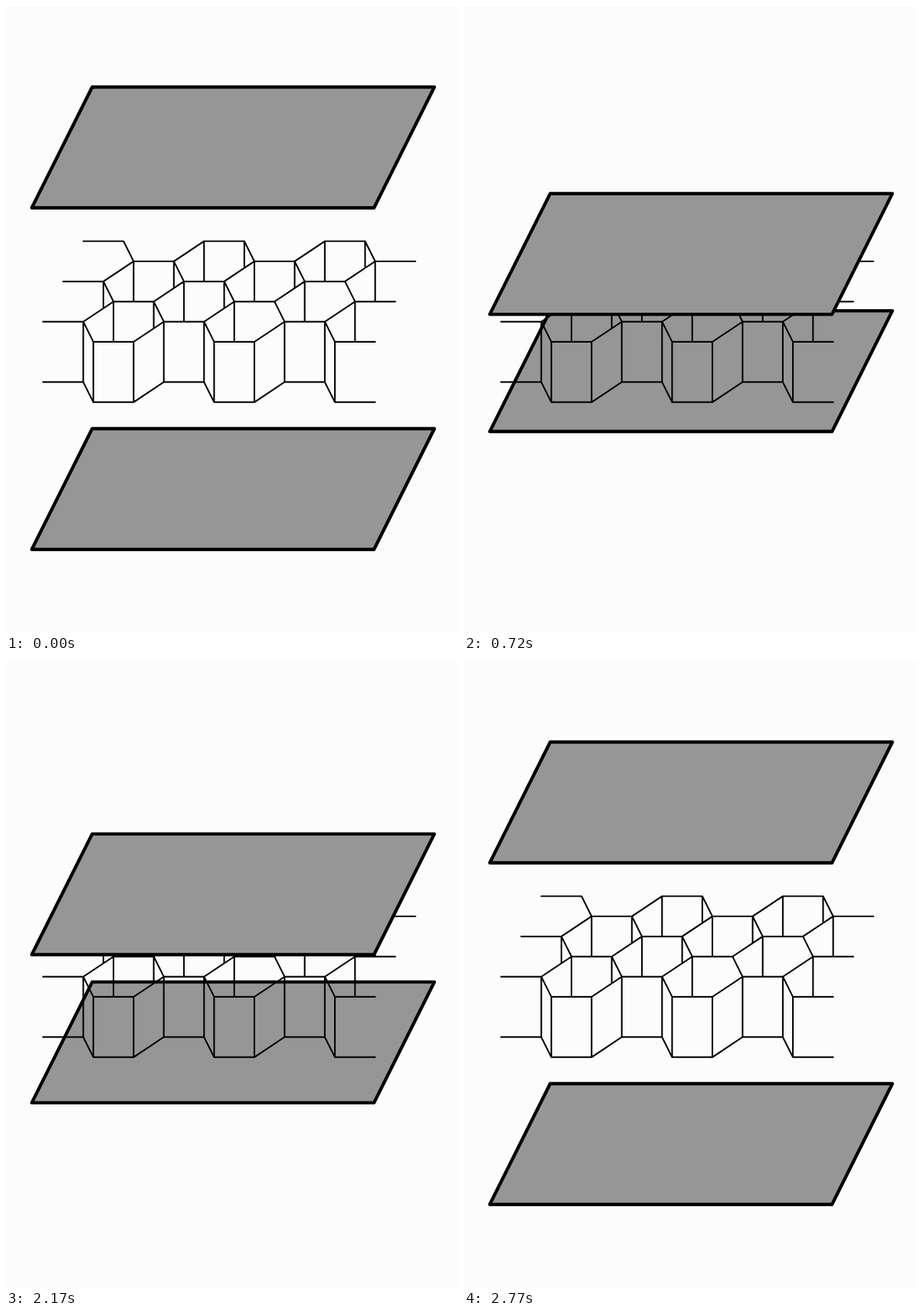
Animation, 635 px wide and 881 px high, one loop 3800 ms. Source, as an HTML page:

```html
<!DOCTYPE html>
<html lang="en">
<head>
<meta charset="utf-8">
<title>Honeycomb sandwich panel</title>
<style>
  html, body { margin: 0; width: 100%; height: 100%; overflow: hidden; background: #fcfcfc; }
  svg { display: block; width: 100%; height: 100%; }
  path { stroke: #000; stroke-linecap: round; stroke-linejoin: round; }
  .plate { fill: #969696; stroke-width: 4.6px; }
  #core { fill: none; stroke-width: 2.2px; vector-effect: non-scaling-stroke; }
</style>
</head>
<body>
<svg viewBox="0 0 635 881">
  <path class="plate" id="bottom" d="M121.1 0H601.8L517 169.7H36.2Z"/>
  <path id="core" transform="translate(52 443.6) scale(28.28)"/>
  <path class="plate" id="top" d="M121.1 0H601.8L517 169.7H36.2Z"/>
</svg>
<script>
const STEP = 30, LOOP = 3800;
const byId = id => document.getElementById(id);

// Zigzag strip edge, in units where one honeycomb period is 6 wide.
const strip = (x, y) =>
  `M${x} ${y}` + 'h2l.5 1h2l1.5 -1'.repeat(2) + 'h2l.5 1h2';

// Rows run front to back; short walls end where the row in front hides them.
function corePath() {
  const missingWalls = ['1:10.5', '1:14', '2:2'];
  let d = strip(0, 3);
  for (let row = 0; row < 3; row++) {
    d += strip(row, -2 * row);
    for (let period = 0; period < 3; period++) {
      const walls = [[2, 0, 4 / 3], [2.5, 1, 2], [4.5, 1, 4 / 3], [6, 0, 2]];
      for (const [dx, dy, visible] of walls.slice(0, period < 2 ? 4 : 2)) {
        const x = 6 * period + dx;
        if (missingWalls.includes(`${row}:${x}`)) continue;
        d += `M${x + row} ${dy - 2 * row}v${row ? visible : 3}`;
      }
      if (row < 2) {
        const x = 6 * period + row, y = -2 * row;
        d += `M${x + 2} ${y}l1.5 -1`;
        if (period < 2) d += `M${x + 6} ${y}l-.5 -1`;
      }
    }
  }
  return d;
}

// 0 = apart, 1 = closed
function closure(t) {
  if (t < 900) return Math.floor(t / STEP) / 30;
  if (t < 1930) return 1;
  return Math.max(0, 1 - Math.floor((t - 1900) / STEP) / 29);
}

function draw(now) {
  const p = closure(now % LOOP);
  byId('top').setAttribute('transform', `translate(0 ${113.9 + 187.1 * p})`);
  byId('bottom').setAttribute('transform', `translate(0 ${593.9 - 207.1 * p})`);
  requestAnimationFrame(draw);
}

byId('core').setAttribute('d', corePath());
draw(0);
</script>
</body>
</html>
```
